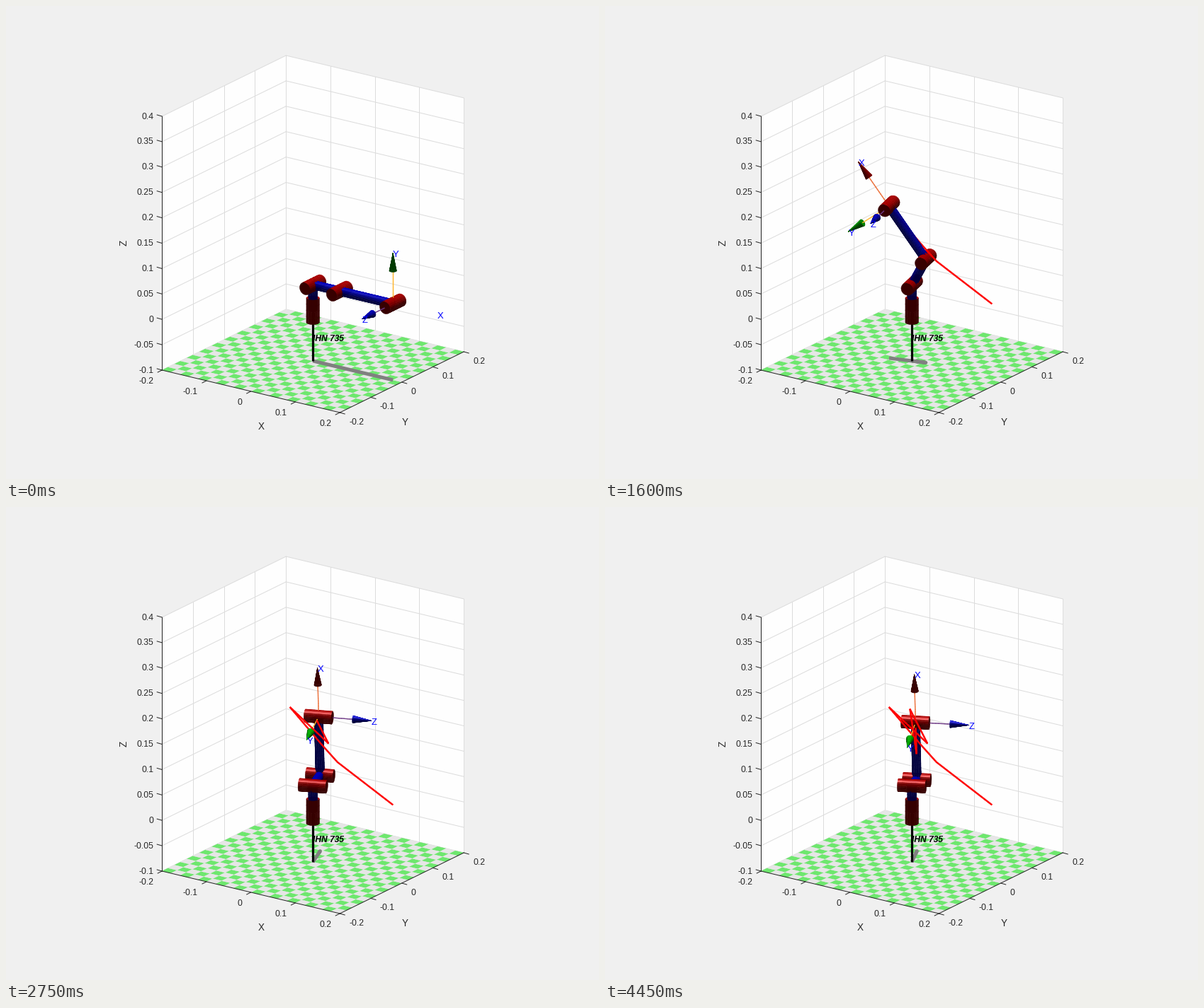
Animation, 837 px wide and 669 px high, one loop 4.5 s. Source, as a matplotlib script:

```python
import numpy as np
import matplotlib.pyplot as plt
from matplotlib.animation import FuncAnimation
from matplotlib.collections import PolyCollection

W, H, DPI = 837, 669, 100
FRAMES, INTERVAL = 90, 50
PX = 72 / DPI  # points per pixel

AZ, EL = np.radians([34.9, 20.05])
VIEW = np.array([np.sin(AZ) * np.cos(EL), -np.cos(AZ) * np.cos(EL), np.sin(EL)])
UP = np.array([0, 0, 1.0])
BASIS = np.array([[627.5, 150], [437.5, -215], [0, -718]])
FLOOR = -0.1
SHOULDER, UPPER, FORE, AXIS = 0.05, 0.06, 0.12, 0.1

# frame, waist, upper arm pitch, forearm pitch (degrees)
POSES = np.array([
    (0, 0, 0, 0), (4, -15, 30, -100), (11, -25, -38, -291),
    (20, 44, -39, -256), (24, 115, 0, -250), (32, 15, 63, -233),
    (44, -25, -22, -628), (47, -25, -18, -630), (55, 112, 0, -624),
    (59, 130, 17, -622), (65, 123, -3.5, -618), (76, -27, -57, -623),
    (78, -26, -49, -624), (89, 116, -8.7, -622)])
TRAIL_FRAMES = [0, 11, 20, 32, 47, 59, 76, 89]

RED, BLUE, GREEN = np.array([(0.9, 0, 0), (0, 0, 1.0), (0, 0.95, 0)])


def project(p):
    """Orthographic view, space to stage pixels."""
    p = np.asarray(p, float)
    return np.array([433.2, 502]) + (p - [0, 0, FLOOR]) @ BASIS


def pose(n):
    return np.radians([np.interp(n, POSES[:, 0], POSES[:, k]) for k in (1, 2, 3)])


def arm(n):
    """Shoulder, elbow, tip and the three tool axes."""
    waist, pitch, tilt = pose(n)
    out = np.array([np.cos(waist), np.sin(waist), 0])
    side = np.array([np.sin(waist), -np.cos(waist), 0])
    shoulder = SHOULDER * UP
    elbow = shoulder + UPPER * (np.cos(pitch) * out + np.sin(pitch) * UP)
    x = np.cos(tilt) * out + np.sin(tilt) * UP
    y = -np.sin(tilt) * out + np.cos(tilt) * UP
    return shoulder, elbow, elbow + FORE * x, (x, y, side)


def shade(color, normal):
    lit = max(normal[2], 0)
    spec = max((2 * lit * normal - UP) @ VIEW, 0) ** 10 if lit else 0
    return np.clip(color * (0.24 + 0.5 * lit) + 0.5 * spec, 0, 1)


class Scene:
    """Collects flat faces and sorts them from far to near."""

    def __init__(self):
        self.faces = []

    def add(self, points, color):
        points = np.asarray(points)
        self.faces.append((points.mean(0) @ VIEW, project(points), color))

    def line(self, start, end, width, color, pieces=12):
        pts = np.linspace(start, end, pieces + 1)
        flat = project(pts)
        step = flat[-1] - flat[0]
        size = np.hypot(*step)
        if size < 1e-6:
            return
        off = np.array([-step[1], step[0]]) / size * width / 2
        for i in range(pieces):
            a, b = flat[i], flat[i + 1]
            depth = (pts[i] + pts[i + 1]) @ VIEW / 2
            self.faces.append((depth, [a + off, b + off, b - off, a - off], color))

    def tube(self, start, end, radius, color, pieces=4, sides=24, cone=False):
        axis = (end - start) / np.linalg.norm(end - start)
        helper = UP if abs(axis[2]) < 0.9 else np.array([1.0, 0, 0])
        u = np.cross(axis, helper)
        u /= np.linalg.norm(u)
        v = np.cross(axis, u)
        angles = np.linspace(0, 2 * np.pi, sides + 1)
        ring = np.outer(np.cos(angles), u) + np.outer(np.sin(angles), v)
        cuts = np.linspace(start, end, pieces + 1)
        radii = np.linspace(radius, 0 if cone else radius, pieces + 1)
        for k in range(sides):
            normal = ring[k] + ring[k + 1]
            normal /= np.linalg.norm(normal)
            if not cone and normal @ VIEW < 0:
                continue
            tint = shade(color, normal)
            for i in range(pieces):
                a, b = cuts[i], cuts[i + 1]
                ra, rb = radii[i], radii[i + 1]
                self.add([a + ra * ring[k], a + ra * ring[k + 1],
                          b + rb * ring[k + 1], b + rb * ring[k]], tint)
        for center, normal in ((start, -axis), (end, axis)):
            if normal @ VIEW > 0 and not (cone and center is end):
                self.add(center + radius * ring[:-1], shade(color, normal))

    def show(self, collection):
        self.faces.sort(key=lambda f: f[0])
        colors = [f[2] for f in self.faces]
        collection.set_verts([f[1] for f in self.faces])
        collection.set_facecolor(colors)
        collection.set_edgecolor(colors)


plt.rcParams["font.family"] = "Liberation Sans"
# the small margin keeps the pixel size from rounding down
fig = plt.figure(figsize=((W + 0.01) / DPI, (H + 0.01) / DPI), dpi=DPI,
                 facecolor="#f0f0f0")
ax = fig.add_axes([0, 0, 1, 1])
ax.set(xlim=(0, W), ylim=(H, 0))
ax.axis("off")


def segment(a, b, color="#262626", width=1, **kw):
    ends = project([a, b])
    return ax.plot(ends[:, 0], ends[:, 1], color=color, lw=width * PX, **kw)


def label(x, y, text, size=12.2, color="#262626", **kw):
    kw.setdefault("va", "center_baseline")
    return ax.text(x, y, text, fontsize=size * PX, color=color, **kw)


def draw_room():
    lo, hi, top = -0.2, 0.2, 0.4
    walls = [[(lo, lo, FLOOR), (lo, hi, FLOOR), (lo, hi, top), (lo, lo, top)],
             [(lo, hi, FLOOR), (hi, hi, FLOOR), (hi, hi, top), (lo, hi, top)]]
    ax.add_collection(PolyCollection([project(w) for w in walls],
                                     facecolor="#fefefe", edgecolor="none", zorder=0))
    for v in np.linspace(lo, hi, 5):
        segment((v, hi, FLOOR), (v, hi, top), "#dcdcdc", zorder=1)
        segment((lo, v, FLOOR), (lo, v, top), "#dcdcdc", zorder=1)
    for z in np.linspace(FLOOR, top, 11):
        segment((lo, lo, z), (lo, hi, z), "#dcdcdc", zorder=1)
        segment((lo, hi, z), (hi, hi, z), "#dcdcdc", zorder=1)

    size = 0.02
    for parity, color in ((0, "#6ee76e"), (1, "#e6e6e6")):
        tiles = [project([(x, y, FLOOR), (x + size, y, FLOOR),
                          (x + size, y + size, FLOOR), (x, y + size, FLOOR)])
                 for i in range(20) for j in range(20) if (i + j) % 2 == parity
                 for x, y in [(lo + i * size, lo + j * size)]]
        ax.add_collection(PolyCollection(tiles, facecolor=color, edgecolor=color,
                                         lw=0.2, zorder=2))

    segment((lo, lo, FLOOR), (hi, lo, FLOOR), zorder=3)
    segment((hi, lo, FLOOR), (hi, hi, FLOOR), zorder=3)
    segment((lo, lo, FLOOR), (lo, lo, top), zorder=3)

    def tick(point, dx, dy):
        x, y = project(point)
        ax.plot([x, x + dx], [y, y + dy], color="#262626", lw=PX, zorder=3)
        return x, y

    for v in np.linspace(lo, hi, 5):
        name = f"{round(v, 1) + 0:g}"
        x, y = tick((v, lo, FLOOR), -6, 3)
        label(x - 12, y + 14.5, name, ha="right")
        x, y = tick((hi, v, FLOOR), 7, 2)
        label(x + 13, y + 12, name, ha="left")
    for z in np.linspace(FLOOR, top, 11):
        x, y = tick((lo, lo, z), -7, -2)
        label(x - 12, y - 1, f"{round(z, 2) + 0:g}", ha="right")
    label(360, 593, "X", 13.5, ha="center")
    label(563, 587, "Y", 13.5, ha="center")
    label(167, 335, "Z", 13.5, ha="center", va="center", rotation=90)


draw_room()
shadow, = ax.plot([], [], color="#808080", lw=5 * PX, zorder=4,
                  solid_capstyle="butt", solid_joinstyle="round")
segment((0, 0, FLOOR), (0, 0, 0), "black", 3.2, zorder=5, solid_capstyle="butt")
body = PolyCollection([], lw=0.35, zorder=6)
ax.add_collection(body)
label(433, 469, "IHN 735", 12, "black", weight="bold", style="italic", zorder=7)
names = [label(0, 0, t, 13, "blue", ha="left", zorder=8) for t in "XYZ"]
TRAIL = np.array([arm(f)[2] for f in TRAIL_FRAMES])


def update(n):
    shoulder, elbow, tip, axes = arm(n)
    side = axes[2]
    base = np.zeros(3)
    scene = Scene()

    scene.tube(base, shoulder, 0.0082, BLUE, 6)
    scene.tube(shoulder, elbow, 0.0082, BLUE, 8)
    scene.tube(elbow, tip, 0.0082, BLUE, 14)
    scene.tube(-0.024 * UP, 0.024 * UP, 0.012, RED)
    for joint in (shoulder, elbow, tip):
        scene.tube(joint - 0.0255 * side, joint + 0.0255 * side, 0.012, RED, 6)

    line_colors = [(0.92, 0.42, 0.2), (1, 0.72, 0.2), (0.43, 0.22, 0.52)]
    for direction, color, thin in zip(axes, (RED, GREEN, BLUE), line_colors):
        if direction[0] > 0.999:  # no arrow while lying along the world X axis
            continue
        end = tip + AXIS * direction
        neck = tip + 0.65 * AXIS * direction
        scene.line(tip, neck, 0.9, thin)
        scene.tube(neck, end, 0.0068, color, 3, 14, cone=True)

    stops = [f for f in TRAIL_FRAMES if f < n] + [n]
    points = np.array([[np.interp(f, TRAIL_FRAMES, TRAIL[:, k]) for k in range(3)]
                       for f in stops])
    for a, b in zip(points[:-1], points[1:]):
        scene.line(a, b, 1.9, (1, 0, 0), 16)
    scene.show(body)

    ground = project([p * [1, 1, 0] + FLOOR * UP for p in (base, elbow, tip)])
    shadow.set_data(ground[:, 0], ground[:, 1])
    for text, direction in zip(names, axes):
        x, y = project(tip + AXIS * direction)
        text.set_position((x, y + 1))
    return [body, shadow, *names]


anim = FuncAnimation(fig, update, frames=FRAMES, interval=INTERVAL,
                     init_func=lambda: update(0), repeat=True, repeat_delay=0)
plt.show()
```
